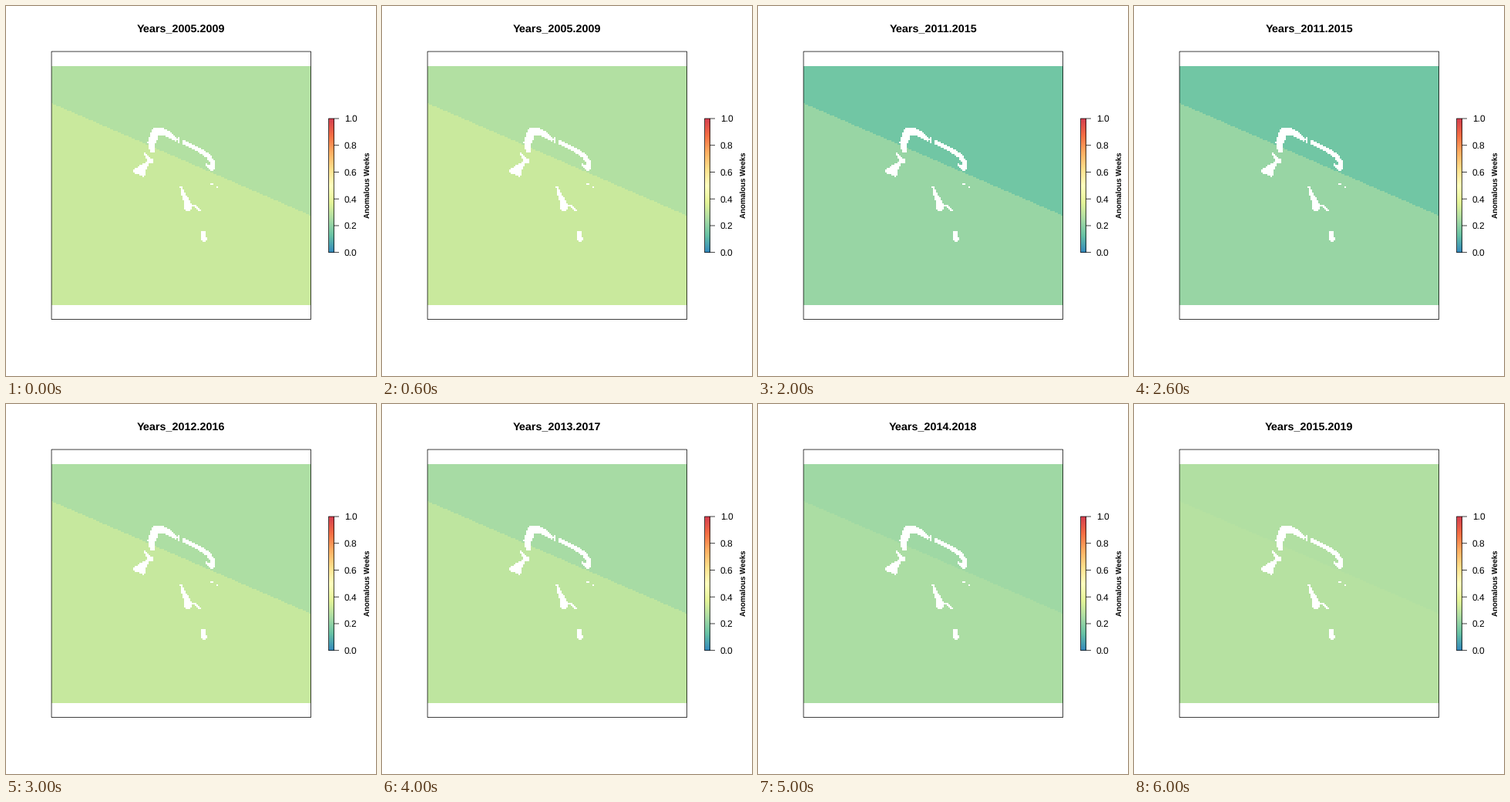
Write a matplotlib script that moves like this. It is 480 by 480 pixels and loops after 7000 ms.

```python
import matplotlib.pyplot as plt
import numpy as np
from matplotlib.animation import FuncAnimation
from matplotlib.colors import LinearSegmentedColormap
from matplotlib.patches import Rectangle

SIZE, DPI = 480, 72
LEFT, RIGHT, TOP, BOTTOM = 59, 396, 78, 388
CELL = 2
LINE = dict(lw=0.75, snap=False)

SPECTRAL = LinearSegmentedColormap.from_list("spectral", [
    "#3288bd", "#66c2a5", "#abdda4", "#e6f598", "#ffffbf",
    "#fee08b", "#fdae61", "#f46d43", "#d53e4f"], N=1024)

# share of anomalous weeks above and below the diagonal, per period
YEARS = [2005, *range(2010, 2016)]
UPPER = [0.267, 0.121, 0.147, 0.256, 0.245, 0.230, 0.263]
LOWER = [0.315, 0.208, 0.216, 0.309, 0.292, 0.250, 0.275]

# islands as brush strokes through (x, y, radius)
ISLANDS = [
    [(190, 187, 3.5), (189, 177, 5), (194, 164, 5.5), (203, 163, 4.5),
     (212, 167, 4), (220, 173, 2.5)],
    [(224, 171, 1), (224, 177, 1)],
    [(231, 177, 2.5), (244, 183, 2.8), (262, 194, 3), (268, 203, 2.8),
     (268, 210, 3)],
    [(260, 206, 1.3), (266, 211, 2.5)],
    [(180, 191, 1), (183, 196, 2), (187, 201, 3.8)],
    [(168, 214, 3), (175, 213, 6), (182, 206, 3)],
    [(175, 213, 6), (178, 218, 3)],
    [(227, 234, 1.4), (229, 242, 2), (234, 252, 4), (236, 260, 5.5)],
    [(243, 259, 1.4), (248, 261, 1.4), (251, 265, 1.4)],
    [(256, 294, 2.4), (257, 302, 3.6)],
    [(267, 231, 1), (267, 231, 1)],
    [(274, 235, 1), (274, 235, 1)],
]


def build_regions():
    """Label each map cell: 0 upper zone, 1 lower zone, 2 land."""
    ys = np.arange(TOP, BOTTOM, CELL)[:, None] + CELL / 2
    xs = np.arange(LEFT, RIGHT, CELL)[None, :] + CELL / 2
    regions = (ys > 126 + (xs - LEFT) * 146 / 337).astype(int)
    for stroke in ISLANDS:
        for start, end in zip(stroke, stroke[1:]):
            for x, y, r in np.linspace(start, end, 16):
                regions[np.hypot(xs - x, ys - y) <= r] = 2
    # expand the cells to pixels
    pixels = regions.repeat(CELL, axis=0).repeat(CELL, axis=1)
    return pixels[:BOTTOM - TOP, :RIGHT - LEFT]


def paint(i):
    white = np.ones(3)
    palette = [SPECTRAL(UPPER[i])[:3], SPECTRAL(LOWER[i])[:3], white]
    return np.array(palette)[REGIONS]


def title_text(i):
    return f"Years_{YEARS[i]}.{YEARS[i] + 4}"


def draw_box(ax, x0, y0, x1, y1):
    ax.add_patch(Rectangle((x0, y0), x1 - x0, y1 - y0, fill=False,
                           ec="black", **LINE))


def draw_legend(ax):
    x0, x1, y0, y1 = 418.5, 425.3, 146, 319.7
    ax.imshow(np.linspace(1, 0, 256)[:, None], cmap=SPECTRAL, aspect="auto",
              extent=(x0, x1, y1, y0), interpolation="nearest")
    draw_box(ax, x0, y0, x1, y1)
    for value in np.linspace(0, 1, 6):
        y = y1 + (y0 - y1) * value
        ax.plot([x1, 432], [y, y], color="black", solid_capstyle="butt",
                **LINE)
        ax.text(439, y + 4.2, f"{value:.1f}", size=12, va="baseline")
    ax.text(472.2, 231.8, "Anomalous Weeks", size=9.6, weight="bold",
            rotation=90, rotation_mode="anchor", ha="center", va="baseline")


plt.rcParams.update({"font.family": "Liberation Sans", "text.hinting": "none"})
REGIONS = build_regions()

fig = plt.figure(figsize=(SIZE / DPI, SIZE / DPI), dpi=DPI, facecolor="white")
ax = fig.add_axes([0, 0, 1, 1])
field = ax.imshow(paint(0), extent=(LEFT, RIGHT, BOTTOM, TOP),
                  interpolation="nearest", aspect="auto")
draw_box(ax, 59.04, 59.04, 395.5, 406.56)
title = ax.text(227.4, 34.7, title_text(0), size=14.4, weight="bold",
                ha="center", va="baseline")
draw_legend(ax)
ax.set(xlim=(0, SIZE), ylim=(SIZE, 0))
ax.axis("off")


def update(i):
    field.set_data(paint(i))
    title.set_text(title_text(i))
    return field, title


anim = FuncAnimation(fig, update, frames=len(YEARS), interval=1000,
                     repeat=True, repeat_delay=0)
plt.show()
```
